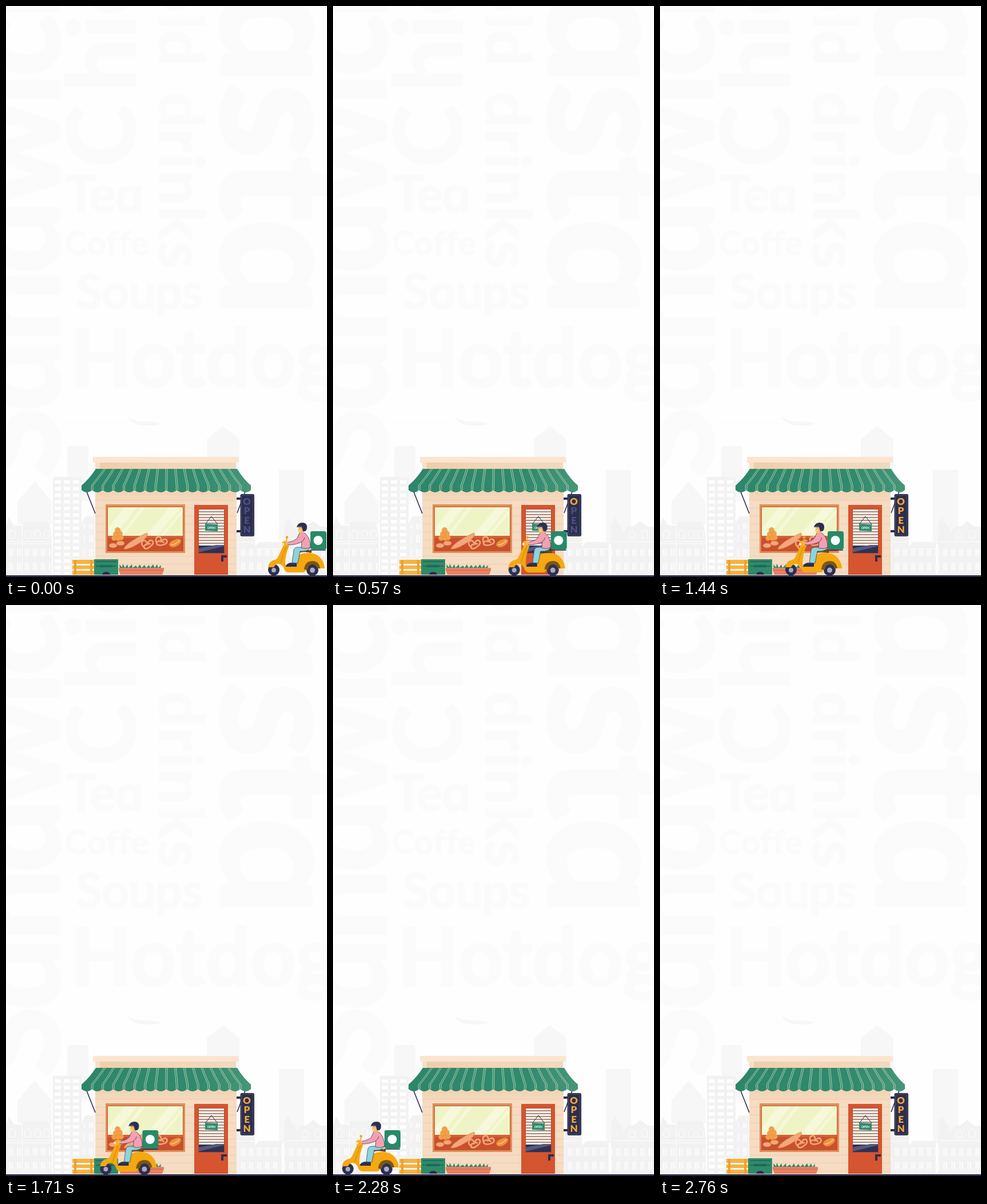
An HTML page that plays this animation: 561 px wide and 998 px high, repeating every 2850 ms.

```html
<!DOCTYPE html>
<html lang="en">
<head>
<meta charset="utf-8">
<title>Bakery delivery</title>
<style>
html, body { margin: 0; width: 100%; height: 100%; overflow: hidden; background: #fefefe; }
svg { display: block; width: 100vw; height: 100vh; }
.words { font: 700 100px Lato, "Noto Sans", sans-serif; fill: #fbfbfb; }
.words text { stroke: #fbfbfb; stroke-width: .025em; stroke-linejoin: round; }
.lamps { font: 900 17px Lato, "Open Sans", sans-serif; text-anchor: middle; fill: #4b5086; }
.tag { font: 700 5px Lato, "Open Sans", sans-serif; text-anchor: middle; fill: #fff; }
.lamps text { animation: 2850ms step-end infinite; }
.lamps text:nth-child(1) { animation-name: lamp1; }
.lamps text:nth-child(2) { animation-name: lamp2; }
.lamps text:nth-child(3) { animation-name: lamp3; }
.lamps text:nth-child(4) { animation-name: lamp4; }
/* lamps switch on at 300, 600, 900 and 1200 ms */
@keyframes lamp1 { 10.526%, to { fill: #f2a63a; } }
@keyframes lamp2 { 21.052%, to { fill: #f2a63a; } }
@keyframes lamp3 { 31.578%, to { fill: #f2a63a; } }
@keyframes lamp4 { 42.105%, to { fill: #f2a63a; } }
.scooter { animation: ride 2850ms infinite; }
/* rides in, waits from 900 to 1500 ms, rides off; one step each 30 ms */
@keyframes ride {
  0% { transform: translateX(0); animation-timing-function: steps(30); }
  31.579% { transform: translateX(-239px); animation-timing-function: linear; }
  52.632% { transform: translateX(-239px); animation-timing-function: steps(42); }
  96.842%, 100% { transform: translateX(-567px); }
}
</style>
</head>
<body>
<svg viewBox="0 0 561 998" preserveAspectRatio="none">
<defs>
  <pattern id="panes" x="82" y="828" width="16" height="11.5" patternUnits="userSpaceOnUse">
    <path d="M3 1h11v6H3z" fill="#fefefe"/>
  </pattern>
  <pattern id="sashes" x="2" y="945" width="14" height="24" patternUnits="userSpaceOnUse">
    <path d="M3 4h3v13H3zM7 4h3v13H7z" fill="#fafafa"/>
  </pattern>
  <pattern id="planks" x="156" y="850" width="247" height="14" patternUnits="userSpaceOnUse">
    <path d="M0 13.5H247" stroke="#ecccab" stroke-width=".8"/>
  </pattern>
  <pattern id="blinds" x="337" y="880" width="44" height="5" patternUnits="userSpaceOnUse">
    <path d="M0 0h44v5H0z" fill="#fbf3ea"/><path d="M0 4h44" stroke="#8d6a5e" stroke-width="1.3"/>
  </pattern>
  <linearGradient id="shade" x2="0" y2="1">
    <stop offset="0" stop-color="#efcfab"/><stop offset="1" stop-color="#f5dcc3"/>
  </linearGradient>
  <linearGradient id="fascia">
    <stop offset="0" stop-color="#f0cda9"/><stop offset=".45" stop-color="#f3d5b6"/><stop offset="1" stop-color="#f0d9c0"/>
  </linearGradient>
  <linearGradient id="cloth">
    <stop offset="0" stop-color="#2d866a"/><stop offset=".7" stop-color="#318a6e"/><stop offset="1" stop-color="#469679"/>
  </linearGradient>
  <clipPath id="glass"><path d="M178 876h131v50H178z"/></clipPath>
</defs>

<g class="words">
  <text transform="translate(92 825) rotate(-90)" font-size="225" letter-spacing="-7">Sɑndwich</text>
  <text transform="translate(225 281) rotate(-90)" font-size="163" dx="0 24">Chicken</text>
  <text transform="translate(268 461) rotate(90)" font-size="108" text-anchor="end" letter-spacing="2.5" word-spacing="16">Cold drinks</text>
  <text transform="translate(378 539) rotate(90)" font-size="300" text-anchor="end" letter-spacing="-3">Pɑstɑ</text>
  <text x="105" y="360" font-size="88" letter-spacing="-2">Teɑ</text>
  <text x="103" y="435" font-size="58" letter-spacing="1">Coffe</text>
  <text x="122" y="529" font-size="84" letter-spacing="-1">Soups</text>
  <text x="113" y="665" font-size="139">Hotdog</text>
</g>

<g fill="#f7f7f7">
  <path d="M212 716q7 10 28 10t31 4q-6 4-27 3-26 0-32-17z"/>
  <path d="M95 729h117v1H95z" fill="#fafafa"/>
  <path d="M107 775q0-6 6-6h25q6 0 6 6v90h-37zM20 866l30-35 30 35v40H20zM351 757l28-23 29 23v60h-57zM477 811h44v130h-44z"/>
</g>
<g fill="#f2f2f2">
  <path d="M82 826q0-3 3-3h44q3 0 3 3v169H82z"/>
  <path d="M0 908l5-14 9 14h14v87H0zM29 908q0-7 7-7h35q7 0 9 34v60H29zM132 904l7-12h16v103h-23z"/>
  <path d="M403 920h32v75h-32zM434 946l8-9h40v58h-48zM486 905l7-11 7 11 7 10v80h-21zM507 920q8-14 18-10l12-10 12 10h12v85h-54z"/>
</g>
<path d="M82 828h50v165H82z" fill="url(#panes)"/>
<g fill="url(#sashes)">
  <path d="M2 945h76v48H2zM136 905h18v88h-18zM404 945h155v48H404z"/>
</g>
<g fill="none" stroke="#fafafa" stroke-width="1.5">
  <path d="M0 936h80M0 940h80M404 937h30M436 949h46M488 936h73M33 930v-10q5-9 10 0v10zM50 930v-10q5-9 10 0v10zM66 930v-10q5-9 10 0v10zM6 930v-10q5-9 10 0v10zM518 930v-7q5-9 10 0v7zM540 930v-10q5-9 10 0v10z"/>
</g>

<path d="M156 838h247v157H156z" fill="#f5dcc3"/>
<path d="M156 838h247v32H156z" fill="url(#shade)"/>
<path d="M156 850h247v144H156z" fill="url(#planks)"/>
<path d="M163 798h239v14H163z" fill="url(#fascia)"/>
<path d="M156 798h8v12h-8z" fill="#f8dfc6"/>
<path d="M152 788h255v10H152z" fill="#fce5cf"/>
<path d="M141 849l15 38M418 849l-14 37" stroke="#2d2e50" stroke-width="1.6"/>
<g id="awning"></g>

<path d="M174 871h139v85H174z" fill="#e08e58"/>
<path d="M177 875h133v78H177z" fill="#c9502d"/>
<path d="M178 876h131v50H178z" fill="#eff4c6"/>
<g clip-path="url(#glass)" fill="#f5f8d9">
  <path d="M207 876h22l-39 50h-22zM237 876h7l-39 50h-7zM286 876h20l-42 50h-20zM311 876h6l-42 50h-6z"/>
</g>
<path d="M178 926h131v4H178z" fill="#d3613a"/>
<g fill="#f3a04a" stroke="#e28731" stroke-width=".5">
  <circle cx="189" cy="930" r="4.500"/><circle cx="196" cy="930" r="4.500"/><circle cx="201" cy="929" r="4.500"/>
  <circle cx="192" cy="923" r="4.500"/><circle cx="199" cy="922" r="4.500"/><circle cx="195" cy="916" r="4.500"/>
</g>
<g fill="#f3a77a" stroke="#dd8152" stroke-width=".7">
  <ellipse cx="187" cy="943" rx="7" ry="4"/><ellipse cx="200" cy="939" rx="7" ry="4"/>
  <path d="M206 949q2-6 14-14t26-14q4 2-2 9-8 8-20 14t-18 5z"/>
  <path d="M285 942q2-7 10-9 8-4 11 1 0 6-8 10-8 5-13-2z" fill="#f0913a"/>
</g>
<path d="M288 942q8 0 15-8" fill="none" stroke="#f7c98a" stroke-width="1.5"/>
<g fill="none" stroke="#f2a777" stroke-width="2.6">
  <path id="pretzel" d="M242 947q-8-7-3-12 5-3 8 5 4-9 9-5 4 5-7 12-8 4-8-3 4-5 12-4"/>
  <use href="#pretzel" transform="rotate(25 248 940) translate(20 -14)"/>
</g>

<path d="M329 872h59v122h-59z" fill="#d4552f"/>
<path d="M336 879h46v78h-46z" fill="#b8452a"/>
<path d="M337 880h44v64h-44z" fill="url(#blinds)"/>
<path d="M337 943h44v13h-44z" fill="#2e3153"/>
<path d="M337 948l30-6h14v2l-44 11z" fill="#555a7c"/>
<path d="M348 906l11-14 11 14" fill="none" stroke="#2d2e50" stroke-width="1"/>
<path d="M348 905l22 1v12l-22-1z" fill="#2f8c6e"/>
<text class="tag" x="359" y="913.5">OPEN</text>
<path d="M376 960h10v4h-6v7h-4z" fill="#2d2e50"/>

<path d="M403 861h8M403 918h8" stroke="#2d2e50" stroke-width="4"/>
<rect x="409.500" y="853" width="24.500" height="74" rx="3" fill="#2c2e4d"/>
<rect x="411.500" y="855" width="20.500" height="70" rx="2" fill="none" stroke="#555a78" stroke-width=".8"/>
<g class="lamps">
  <text x="421" y="871.500">O</text><text x="421" y="888">P</text>
  <text x="421" y="904.500">E</text><text x="421" y="921">N</text>
</g>

<g fill="#f7b33c">
  <path d="M116 968h38v7h-38zM116 978h38v6h-38zM116 987h38v7h-38z"/>
  <path d="M119 968h4v26h-4zM147 968h4v26h-4z" fill="#eda12c"/>
</g>
<path d="M154 967h42v27h-42z" fill="#2f8a6a"/>
<path d="M157 971h36M157 979h36" stroke="#1f6e58" stroke-width="2"/>
<path d="M168 994q1-5 7-5t7 5z" fill="#2d2e50"/>
<path d="M164 977h22v4h-22z" fill="#20685a"/>
<path d="M199 984l-1-8 5 5 1-6 4 7 4-6 2 6 6-6 1 6 6-4 3 4 4-6 3 6 5-5 3 5 5-5 2 5 5-6 3 6 4-6 2 6 5-5-1 9z" fill="#2f8a6a"/>
<path d="M197 982h79v4l-3 8h-73l-3-8z" fill="#e88064"/>
<path d="M198 986h77" stroke="#cf6548" stroke-width="1"/>
<path d="M0 995h561v3H0z" fill="#2d2c4c"/>

<g class="scooter">
  <g fill="#2d2e50">
    <circle cx="468" cy="985.500" r="10"/><circle cx="535.500" cy="985.500" r="10.500"/>
  </g>
  <g fill="#a9acc4"><circle cx="468" cy="986" r="4"/><circle cx="535.500" cy="986" r="4.500"/></g>
  <path d="M532 921q0-3 3-3h21q4 0 4 4v24q0 4-4 4h-20q-4 0-4-4z" fill="#268a68"/>
  <circle cx="545.500" cy="934" r="8" fill="#fff"/>
  <path d="M531 951h28" stroke="#2d2e50" stroke-width="1.500"/>
  <path d="M510 955q7-4 18-2l6 1" fill="none" stroke="#6b4a18" stroke-width="4"/>
  <!-- front fender, leg shield, floor and tail in one outline -->
  <path d="M458 981q1-11 12-13 4-1 6-6l9-20 5-2 5 3q-7 16-7 32 0 3 4 3h13q-1-13 6-18 5-4 17-4 15 0 22 9 6 7 7 18h-11q-2-9-10-9t-11 11q-2 5-7 5h-24q-7 0-9-9-4-6-9-6-5 0-8 6z" fill="#f5a80f"/>
  <path d="M521 985q1-14 14-15 12 0 14 13h-5q-2-7-9-7-6 1-8 9z" fill="#7a5618"/>
  <path d="M480 974q4-16 10-30" fill="none" stroke="#c98713" stroke-width="1"/>
  <circle cx="487" cy="940" r="5" fill="#f6b02b"/>
  <path d="M490 937l1-9" stroke="#f4a60d" stroke-width="1.600"/>
  <circle cx="491" cy="928.500" r="2.200" fill="#f4a60d"/>
  <circle cx="484" cy="940.500" r="2" fill="#fff0c5"/>
  <path d="M532 946q-3 8-18 7l-4 21-10-1 3-22q1-5 8-5z" fill="#8bd5dd" stroke="#2d2e50" stroke-width=".7"/>
  <path d="M489 980q0-5 8-7l11 1v6z" fill="#2d2e50"/>
  <path d="M513 921q7-3 12 3 7 8 7 22-8 4-16 1l1-10q-9 4-20 5l-5-1 1-4q10-1 16-7z" fill="#f4a0b1" stroke="#2d2e50" stroke-width=".7"/>
  <path d="M516 937q5-3 6-8" fill="none" stroke="#2d2e50" stroke-width=".8"/>
  <path d="M489 936h5l-1 5h-4z" fill="#f3b06f"/>
  <path d="M511 910h10v11q-5 3-8 0l-2-3z" fill="#eeb277"/>
  <path d="M510 914l7 1-2 5-4-1z" fill="#f5d16b"/>
  <path d="M508 911q2-8 10-8 8 0 8 8 0 5-3 7h-4l-2-7z" fill="#2d2e50"/>
  <path d="M509 910h8" stroke="#767b9d" stroke-width="1"/>
</g>
</svg>
<script>
const count = 16, left = 132, right = 428;
const lowX = i => left + i * (right - left) / count;
const topX = i => 157 + i * 247 / count;

// Scalloped hem from right to left, then slightly hollow sides
let edge = `M157 809H404Q414 826 ${right} 838V846`;
let lines = "";
for (let i = count; i > 0; i--) {
  const mid = (lowX(i) + lowX(i - 1)) / 2;
  edge += `Q${mid} 854 ${lowX(i - 1)} 846`;
  if (i < count) {
    for (const gap of [-1.2, 1.6]) {
      const low = lowX(i) + gap;
      lines += `M${topX(i) + gap} 809Q${(topX(i) + low) / 2 + gap / 2} 825 ${low} 838V846`;
    }
  }
}
edge += "V838Q146 826 157 809Z";
document.getElementById("awning").innerHTML = `
  <path d="${edge}" fill="url(#cloth)"/>
  <path d="${lines}" fill="none" stroke="#cfe0c2" stroke-width=".8"/>`;
</script>
</body>
</html>
```
